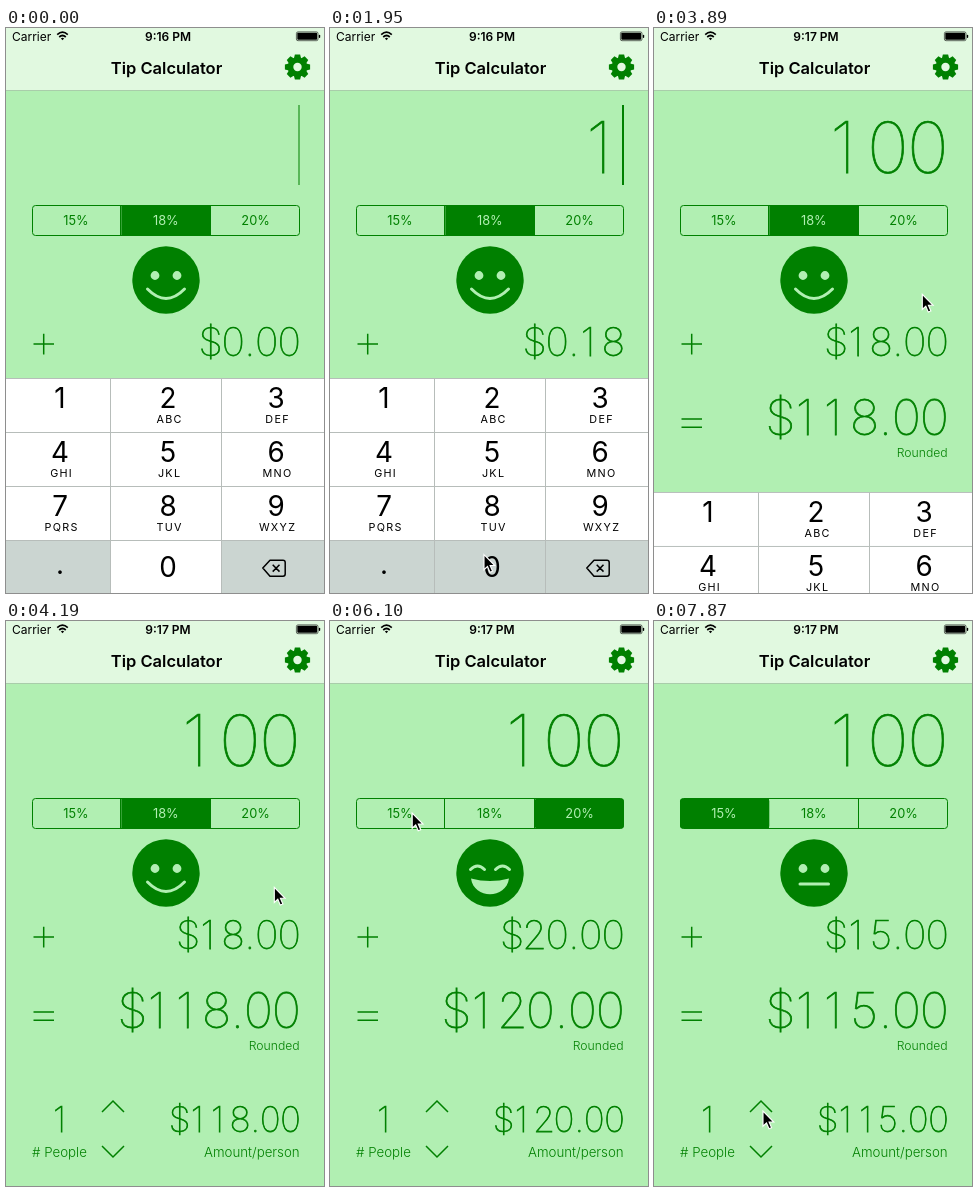
An HTML page for the animation above (8000 ms loop, 318 px wide and 565 px high).

```html
<!DOCTYPE html>
<html lang="en">
<head>
<meta charset="utf-8">
<title>Tip Calculator</title>
<style>
  html, body { margin: 0; width: 100%; height: 100%; overflow: hidden; background: #b1efb2; }
  svg { display: block; width: 318px; height: 565px; font-family: Inter, Roboto, sans-serif; }
  .thin { font-weight: 100; font-optical-sizing: none; text-anchor: middle; fill: #008000; stroke: #008000; stroke-width: .75; }
  .label { font-size: 13px; fill: #008000; }
  .light { font-weight: 300; }
  .line { fill: none; stroke: #008000; stroke-width: 1.5; }
  .frame { stroke-width: 1; }
  .mid { text-anchor: middle; }
  .end { text-anchor: end; }
</style>
</head>
<body>
<svg id="stage" viewBox="0 0 318 565" xmlns="http://www.w3.org/2000/svg">
  <rect width="318" height="565" fill="#b1efb2"/>

  <rect width="318" height="62" fill="#e1f9e0"/>
  <rect y="62" width="318" height="1" fill="#a9cdaa"/>
  <text x="6" y="12.5" font-size="12">Carrier</text>
  <g fill="none" stroke="#000" stroke-width="1.7">
    <path d="M51.2 6.6Q56.5 1.8 61.8 6.6M53.2 9Q56.5 6 59.8 9"/>
    <path d="M56.5 12.2L54.9 10.4Q56.5 9.2 58.1 10.4Z" fill="#000" stroke="none"/>
  </g>
  <text id="clock" class="mid" y="12.5" font-size="12" font-weight="600"></text>
  <rect x="290.4" y="3.9" width="21.6" height="8.8" rx="1.6" fill="none" stroke="#000" stroke-width=".6"/>
  <rect x="291.3" y="4.8" width="19.8" height="7" rx=".8"/>
  <rect x="312.8" y="6.7" width="1.4" height="3.2" rx=".7"/>
  <text class="mid" x="160.5" y="46" font-size="16.5" font-weight="600">Tip Calculator</text>
  <g id="gear" transform="translate(291.5 39)" fill="#008000">
    <circle r="7" fill="none" stroke="#008000" stroke-width="5.6"/>
  </g>

  <text id="bill" class="thin" y="144.5"></text>
  <rect id="caret" x="292" y="77" width="2" height="80" fill="#008000"/>

  <g id="segments"></g>
  <rect class="line frame" x="26.5" y="177.5" width="267" height="30" rx="3"/>
  <path class="line frame" d="M114.5 178V207M204.5 178V207"/>

  <circle cx="160" cy="252" r="33.7" fill="#008000"/>
  <g fill="none" stroke="#b1efb2" stroke-width="3" stroke-linecap="round">
    <path id="face18" d="M141.5 261Q160 280 178.5 261"/>
    <path id="face15" d="M146 263H174.5"/>
    <g id="face20">
      <path d="M140.5 248.5Q147.5 241.5 154.5 248.5M165.5 248.5Q172.5 241.5 179.5 248.5"/>
      <path d="M141 257.5Q160 262.5 179 257.5C176 278.5 144 278.5 141 257.5Z" fill="#b1efb2" stroke="none"/>
    </g>
    <path id="eyes" d="M149 247.5h.01M171 247.5h.01" stroke-width="8.8"/>
  </g>

  <path class="line" d="M27.5 316H48M37.7 305.8V326.5M27.5 391H48M27.5 399.3H48"/>
  <text id="tip" class="thin" y="328"></text>
  <text id="total" class="thin" y="406.5"></text>
  <text class="label light end" x="293.7" y="428.5" style="font-size:12.2px">Rounded</text>
  <text id="people" class="thin" y="511"></text>
  <text id="share" class="thin" y="511"></text>
  <text class="label light" x="26" y="535.5" style="font-size:13.3px">#&#160;People</text>
  <text class="label light end" x="293.7" y="535.5" style="font-size:13.3px">Amount/person</text>
  <path class="line" d="M96 491L107 480L118 491M96 525L107 536L118 525"/>

  <g id="pad"></g>
  <path id="mouse" d="M0 0V15.2L3.5 12L6 17.8L8.6 16.7L6.1 11H10.8Z" stroke="#fff" stroke-width="1.1"/>
</svg>
<script>
const LOOP = 8000, TICKS = 54;   // the screen refreshes 54 times per loop
const GREEN = '#008000', PALE = '#b1efb2', GREY = '#cbd5d1';
const $ = id => document.getElementById(id);
const clamp = v => Math.max(0, Math.min(1, v));

function add(parent, tag, attrs, text) {
  const el = document.createElementNS('http://www.w3.org/2000/svg', tag);
  for (const k in attrs) el.setAttribute(k, attrs[k]);
  if (text) el.textContent = text;
  parent.appendChild(el);
  return el;
}

// Right-aligned figures in equal cells, each glyph centred in its own.
function figures(id, text, size, right) {
  const el = $(id);
  let x = right;
  const xs = [...text].reverse().map(c => {
    const w = size * (c === '.' ? .278 : .556);
    x -= w;
    return x + w / 2 - (c === '1' ? size * .07 : 0);
  });
  el.setAttribute('font-size', size * .982);
  el.setAttribute('x', xs.reverse().join(' '));
  el.textContent = text;
}

for (let i = 0; i < 8; i++)
  add($('gear'), 'path', { d: 'M-3.6 -8.5L-2.6 -12.6H2.6L3.6 -8.5Z', transform: `rotate(${i * 45})` });

const segments = [15, 18, 20].map((pct, i) => {
  const x = 26 + i * 89.3;
  return {
    pct,
    box: add($('segments'), 'rect', { x, y: 177.5, width: 89.3, height: 30, rx: i === 1 ? 0 : 3, fill: GREEN }),
    text: add($('segments'), 'text', { class: 'label mid', x: 70 + i * 89.8, y: 197, style: 'font-size:12.8px' }, pct + '%')
  };
});

const pad = $('pad'), keys = {};
const letters = 'ABC DEF GHI JKL MNO PQRS TUV WXYZ'.split(' ');
add(pad, 'rect', { y: 350, width: 318, height: 216, fill: '#b7bdba' });
[...'123456789.0<'].forEach((name, i) => {
  const c = i % 3, r = Math.floor(i / 3);
  const x = c * 111 - 6, y = 350 + r * 54, mid = 54 + c * 108;
  const side = r === 3 && c !== 1;
  keys[name] = add(pad, 'rect', { x, y: y + 1, width: 110, height: 53, fill: side ? GREY : '#fff' });
  if (name === '<') {
    add(pad, 'path', {
      d: 'M256.8 540L264 532.2H277Q279.2 532.2 279.2 534.4V546Q279.2 548.2 277 548.2H264ZM266.7 536.8L273.5 543.6M273.5 536.8L266.7 543.6',
      fill: 'none', stroke: '#000', 'stroke-width': 1.5, 'stroke-linejoin': 'round'
    });
    return;
  }
  add(pad, 'text', { class: 'mid', x: mid, y: r === 3 ? (side ? 546 : 549) : y + 30, 'font-size': 27.8 }, name);
  if (i > 0 && i < 9)
    add(pad, 'text', { class: 'mid', x: mid + 1.6, y: y + 45, 'font-size': 10.8, 'letter-spacing': 1.3 }, letters[i - 1]);
});

// Times below are in ticks.
const taps = [
  { key: '1', down: 9, up: 10 },
  { key: '0', down: 13, up: 14 },
  { key: '0', down: 16, up: 17 },
  { key: '20%', down: 34, up: 35 },
  { key: '15%', down: 42, up: 43 }
];
const trips = [
  { start: 6, end: 8, from: [96, 425], to: [68.5, 377] },
  { start: 9, end: 11, to: [154, 526.5] },
  { start: 24, end: 24, to: [268.3, 266.3] },
  { start: 29, end: 33, to: [269.2, 190] },
  { start: 38, end: 41, to: [82.2, 192] },
  { start: 47, end: 51, to: [162, 548] },
  { start: 51, end: 53, to: [109, 490] }
];

function mouseAt(n) {
  let pos = trips[0].from;
  for (const { start, end, to } of trips) {
    if (n < start) break;
    const p = end > start ? clamp((n - start) / (end - start)) : 1;
    const ease = 1 - (1 - p) ** 2;
    pos = pos.map((v, i) => v + (to[i] - v) * ease);
  }
  return pos;
}

function draw(t) {
  const n = Math.floor(t / LOOP * TICKS);
  let bill = '', rate = 18, held = '', typed = -3;
  for (const { key, down, up } of taps) {
    const digit = key.length === 1;
    if (n >= down && n < up) held = key;
    if (n >= down && digit) typed = up;
    if (n >= up) digit ? bill += key : rate = parseInt(key);
  }
  const tip = bill * rate / 100, sum = '$' + (+bill + tip).toFixed(2);

  $('clock').textContent = n < 17 ? '9:16 PM' : '9:17 PM';
  $('clock').setAttribute('x', 162);

  const beat = Math.max(0, n - typed) % 9;
  $('caret').setAttribute('opacity', n < 26 ? clamp(Math.abs(beat - 4.5) - 1) : 0);

  figures('bill', bill, 72, 294);
  figures('tip', '$' + tip.toFixed(2), 40.4, 294.5);
  figures('total', sum, 50.4, 294.5);
  figures('share', sum, 36.2, 294.5);
  figures('people', '1', 36.2, 66);

  for (const { pct, box, text } of segments) {
    const on = pct === rate;
    box.setAttribute('opacity', on ? 1 : held === pct + '%' ? .17 : 0);
    text.style.fill = on ? PALE : GREEN;
    $('face' + pct).setAttribute('opacity', on ? 1 : 0);
  }
  $('eyes').setAttribute('opacity', rate === 20 ? 0 : 1);

  for (const k of '01') keys[k].setAttribute('fill', held === k ? GREY : '#fff');
  const slide = 220 * (1 - (1 - clamp((n - 25) / 3)) ** 1.8);
  pad.setAttribute('transform', `translate(0 ${slide})`);

  const shown = n >= 6 && n < 18 || n >= 24;
  $('mouse').setAttribute('visibility', shown ? 'visible' : 'hidden');
  $('mouse').setAttribute('transform', `translate(${mouseAt(n)})`);
}

function tick() {
  draw(performance.now() % LOOP);
  requestAnimationFrame(tick);
}
tick();
</script>
</body>
</html>
```
